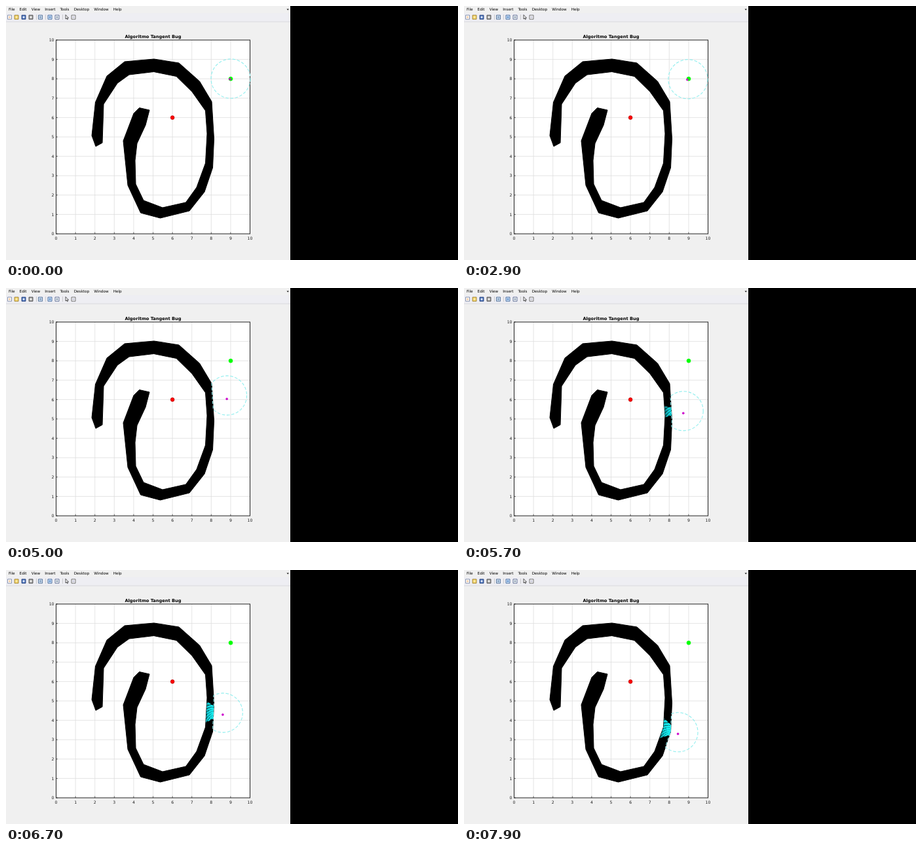
An HTML page with a canvas for the animation above (8000 ms loop, 690 by 388 pixels).

```html
<!DOCTYPE html>
<html lang="pt">
<head>
<meta charset="utf-8">
<title>Algoritmo Tangent Bug</title>
<style>
html, body { margin: 0; width: 690px; height: 388px; overflow: hidden; background: #000; }
svg, canvas { position: absolute; left: 0; top: 0; }
text { font-family: "DejaVu Sans", sans-serif; fill: #000; }
#menu { font-size: 5.7px; }
#ticks text { font-size: 6.1px; fill: #1c1c1c; }
</style>
</head>
<body>
<svg width="690" height="388" viewBox="0 0 690 388">
  <rect width="434" height="388" fill="#f0f0f0"/>
  <rect y="11" width="434" height="13" fill="#eeeef3"/>
  <path d="M0 24h434" stroke="#d4d4d8" stroke-width=".8"/>
  <text id="menu" y="7.4"></text>
  <path d="M428.5 4.5h3.4l-1.7 2z" fill="#111"/>
  <g id="icons" stroke-width=".8"></g>
  <path d="M46.5 13v8M60.5 13v8M86.5 13v8" stroke="#bbb" stroke-width=".7"/>
  <path d="M91 13.5v6.4l1.5-1.4 1 2.2 1-.5-1-2h2z" fill="#fff" stroke="#111" stroke-width=".7"/>
  <text x="224.5" y="49" text-anchor="middle" font-size="6.65" font-weight="bold">Algoritmo Tangent Bug</text>
  <rect x="76.5" y="52" width="296" height="296" fill="#fff"/>
  <path id="grid" stroke="#dedede" stroke-width=".8"/>
  <rect x="76.5" y="52" width="296" height="296" fill="none" stroke="#222"/>
  <path id="marks" stroke="#262626" stroke-width=".7"/>
  <g id="ticks"></g>
</svg>
<canvas id="stage" width="690" height="388"></canvas>
<script>
const byId = id => document.getElementById(id);
const UNIT = 29.6, LEFT = 76.5, TOP = 52, BOTTOM = 348, RANGE = 30, LOOP = 8000;

// Menu, toolbar and axes
byId('menu').innerHTML = 'File Edit View Insert Tools Desktop Window Help'.split(' ')
  .map((label, i) => `<tspan dx="${i ? 7.05 : 4}">${label}</tspan>`).join('');

const icons = [
  [5.5, '#fff', '#6d7c9c', '#f6d3b0'], [16, '#f3d25e', '#94752c', '#f9e9a8'],
  [27, '#3f68b5', '#243f78', '#dfe8f6'], [38, '#999', '#444', '#eee'],
  [52.5, '#cfe0f2', '#3f5f88', '#8fa9c6'], [67, '#d7e9fb', '#2c5590', '#6d9bd2'],
  [78, '#fff', '#3f5280', '#9ab'], [103, '#f7f7f7', '#555', '#ccd']
];
byId('icons').innerHTML = icons.map(([x, fill, edge, core]) =>
  `<path d="M${x - 3} 14h6v6.2h-6z" fill="${fill}" stroke="${edge}"/>
   <path d="M${x - 1.5} 15.6h3v3h-3z" fill="${core}"/>`).join('');

let grid = '', marks = '', labels = '';
for (let i = 0; i <= 10; i++) {
  const x = LEFT + i * UNIT, y = BOTTOM - i * UNIT;
  if (i % 10) grid += `M${x} ${TOP}v296M${LEFT} ${y}h296`;
  marks += `M${x} ${BOTTOM}v-2.5M${LEFT} ${y}h2.5`;
  labels += `<text x="${x}" y="356.5" text-anchor="middle">${i}</text>
    <text x="73.5" y="${y + 2.2}" text-anchor="end">${i}</text>`;
}
byId('grid').setAttribute('d', grid);
byId('marks').setAttribute('d', marks);
byId('ticks').innerHTML = labels;

const ctx = byId('stage').getContext('2d');
const wall = new Path2D(`M131 198L136.5 147 154 107 181 85 226 81 264 87 295.5 115 314 146
  317.5 203 315.5 247 303 284 280 313 235.5 324 205.5 316 186 274 179 206 195 164 203.5 155.5
  219 159 213 182 200 210 197 236 198 272 210 297 239 308 274.5 300 291 277 304.5 240
  307 195 304.5 160 284 131 260 107.5 225.5 100.5 188 105 170 118 149 150 147 209 137 214.5Z`);

// The robot stands still at first, then moves each tick except for short pauses
const pauses = [33, 43, 51, 76];
function stepAt(ms) {
  const tick = Math.floor(ms / 100);
  return Math.max(0, tick - 28 - pauses.filter(p => p <= tick).length);
}

const mix = (a, b, u) => a + (b - a) * u;
const bend = (a, b, c, u) => mix(mix(a, b, u), mix(b, c, u), u);

// Straight to the wall, a turn, then slowing down along the wall
function position(step) {
  if (step < 11) return [mix(343, 331.3, step / 11), mix(111, 119.2, step / 11)];
  if (step < 20) {
    const u = (step - 11) / 9;
    return [bend(331.3, 346, 337.5, u), bend(119.2, 135, 164.1, u)];
  }
  const n = step - 20;
  return [337.5 - 0.39 * n, 164.1 + 5.32 * n ** 0.836];
}

function disc(x, y, r, fill, edge = fill) {
  ctx.beginPath();
  ctx.arc(x, y, r, 0, 7);
  ctx.fillStyle = fill;
  ctx.fill();
  ctx.strokeStyle = edge;
  ctx.lineWidth = 0.6;
  ctx.stroke();
}

// Distances at which a ray enters and leaves the wall
function castRay(x, y, c, s) {
  let enter = 0, leave = 0;
  for (let r = 8; r <= RANGE; r += 0.5) {
    if (ctx.isPointInPath(wall, x + r * c, y + r * s)) {
      enter = enter || r;
      leave = r;
    }
  }
  return { enter, leave };
}

function drawSensor(x, y) {
  const outline = new Path2D(), through = [];
  for (let i = 0; i < 240; i++) {
    const a = i * Math.PI / 120, c = Math.cos(a), s = Math.sin(a);
    const { enter, leave } = castRay(x, y, c, s);
    const r = enter || RANGE;
    outline.lineTo(x + r * c, y + r * s);
    if (enter && leave < RANGE) through.push({ c, s, enter, leave, i });
  }
  outline.closePath();
  ctx.lineWidth = 1.1;
  ctx.strokeStyle = '#8eeeee';
  ctx.setLineDash([4.6, 2.6]);
  ctx.stroke(outline);

  // Readings that cross the wall
  const shade = ctx.createLinearGradient(x - RANGE, 0, x - 12, 0);
  shade.addColorStop(0.1, '#128c92');
  shade.addColorStop(0.4, '#10d4dc');
  shade.addColorStop(0.8, '#18f0f4');
  ctx.strokeStyle = shade;
  ctx.lineWidth = 1.2;
  ctx.setLineDash([4.6, 1.8]);
  for (const { c, s, enter, leave, i } of through) {
    ctx.lineDashOffset = i * 0.9;
    ctx.beginPath();
    ctx.moveTo(x + enter * c, y + enter * s);
    ctx.lineTo(x + leave * c, y + leave * s);
    ctx.stroke();
  }
  ctx.setLineDash([]);
  ctx.lineDashOffset = 0;
}

function draw(step) {
  ctx.clearRect(0, 0, 690, 388);
  ctx.fillStyle = ctx.strokeStyle = '#000';
  ctx.lineWidth = 1;
  ctx.fill(wall);
  ctx.stroke(wall);
  drawSensor(...position(step));
  disc(254.1, 170.5, 2.9, '#f00', '#a00');
  disc(343, 111.2, 3, '#0f0');
  disc(...position(step + 1), 1.5, '#cc00cc');
}

let shown = -1;
function frame() {
  const step = stepAt(performance.now() % LOOP);
  if (step !== shown) draw(shown = step);
  requestAnimationFrame(frame);
}
frame();
</script>
</body>
</html>
```
